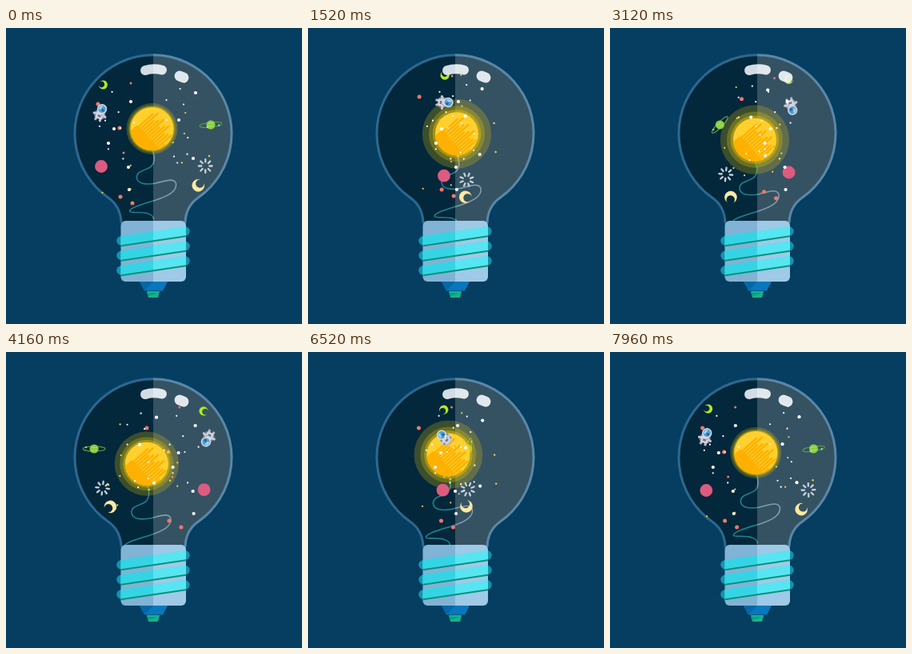
Write an HTML page with a canvas that moves like this. It is 370 px wide and 370 px high and loops after 8000 ms.

```html
<!DOCTYPE html>
<html lang="en">
<head>
<meta charset="utf-8">
<title>Space in a light bulb</title>
<style>
html, body { margin: 0; width: 100%; height: 100%; overflow: hidden; background: #053e60; }
canvas { display: block; width: 370px; height: 370px; }
</style>
</head>
<body>
<canvas id="c"></canvas>
<script>
const LOOP = 8000, TAU = Math.PI * 2;
const canvas = document.getElementById('c');
const ctx = canvas.getContext('2d');
const dpr = window.devicePixelRatio || 1;
canvas.width = canvas.height = 370 * dpr;

// Straight there and back; each way may bow vertically, lean shifts the bow's peak.
function drift(t, x, y, { dx, dy = 0, out = 0, back = 0, lean = 1 }) {
  const going = t < LOOP / 2;
  const k = going ? t / 4000 : 2 - t / 4000;
  const bow = going ? out * Math.sin(Math.PI * k ** lean) : back * Math.sin(Math.PI * k);
  return [x + dx * k, y + dy * k + bow];
}

let seed = 11;
function rand(min, max) {
  seed = (seed * 16807) % 2147483647;
  return min + (max - min) * seed / 2147483647;
}

function scatter(n, x, y, w, h) {
  return Array.from({ length: n }, () => [rand(x, x + w), rand(y, y + h)]);
}

const eastward = { dx: 84 };
const westward = { dx: -51, out: -5.3, back: 5 };
const arching = { dx: 63.5, out: -9.7 };
const falling = { dx: -84, dy: 24, out: -19 };
const rising = { dx: 61, dy: -35, out: 9 };

const redStars = [
  { color: '#f0776b', r: 2.5, path: arching, pts: [[115, 95], [142, 125], [143, 211], [158, 219]] },
  { color: '#f0776b', r: 1.5, path: arching, pts: [[156, 69], [147, 156]] }
];
const stars = [
  { color: '#fff', r: 2.1, path: eastward,
    pts: [[156, 92], [128, 144], [135, 126], [153, 174], [154, 202]] },
  { color: '#fff', r: 2.1, path: westward, pts: [[237, 81], [216, 115], [234, 163]] },
  { color: '#fff', r: 1.1, path: eastward, pts: scatter(8, 117, 75, 50, 107) },
  { color: '#fff', r: 1.1, path: westward, pts: scatter(8, 200, 65, 46, 130) },
  { color: '#f5d34a', r: 1.1, path: falling, pts: scatter(5, 207, 65, 18, 128) },
  { color: '#f5d34a', r: 1.1, path: rising, pts: scatter(3, 113, 153, 45, 66) },
  { color: '#f5d34a', r: 1.2, path: westward, pts: [[252, 124], [254, 160]] }
];

// Two flat tones meeting at the bulb's centre line.
function split(left, right, x = 184) {
  const g = ctx.createLinearGradient(x - 1, 0, x + 1, 0);
  g.addColorStop(.5, left);
  g.addColorStop(.5, right);
  return g;
}

function disc(x, y, r, color) {
  ctx.fillStyle = color;
  ctx.beginPath();
  ctx.arc(x, y, r, 0, TAU);
  ctx.fill();
}

function poly(color, ...p) {
  ctx.fillStyle = color;
  ctx.beginPath();
  for (let i = 0; i < p.length; i += 2) ctx.lineTo(p[i], p[i + 1]);
  ctx.fill();
}

function box(x, y, w, h, r, color) {
  ctx.fillStyle = color;
  ctx.beginPath();
  ctx.roundRect(x, y, w, h, r);
  ctx.fill();
}

function line(x1, y1, x2, y2, w, color) {
  ctx.strokeStyle = color;
  ctx.lineWidth = w;
  ctx.beginPath();
  ctx.moveTo(x1, y1);
  ctx.lineTo(x2, y2);
  ctx.stroke();
}

function placed([x, y], angle, draw) {
  ctx.save();
  ctx.translate(x, y);
  ctx.rotate(angle);
  draw();
  ctx.restore();
}

const bulb = new Path2D(
  'M144 243C143.5 230 138 219 127 211.5A98 98 0 1 1 241 211.5C230 219 224.5 230 224 243');
const cord = new Path2D(
  'M183 150C186 160 188 168 181 174C172 179 164 179 164 187C165 196 178 196 188 194' +
  'C200 191 210 187 213 194C215 204 203 210 188 215C172 220 156 224 155 229' +
  'C156 232 170 229 178 232C182 233 185 236 185 239');

function drawGlass() {
  ctx.fillStyle = split('#03273b', '#355263');
  ctx.fill(bulb);
  ctx.strokeStyle = split('#2c688f', '#5987a7');
  ctx.lineWidth = 3;
  ctx.stroke(bulb);
}

function drawCord(x, y) {
  ctx.save();
  ctx.translate(x - 183, y - 126);
  ctx.strokeStyle = split('#1f7f8c', '#7f9ba8', 184 - x + 183);
  ctx.lineWidth = 1.6;
  ctx.stroke(cord);
  ctx.restore();
}

function drawBase() {
  poly('#0877bb', 167, 317, 202, 317, 196, 328.5, 173, 328.5);
  poly('#0667a6', 167, 317, 184, 317, 173, 328.5);
  poly('#12b48c', 176, 329, 192, 329, 190, 337, 178, 337);
  poly('#0d9a80', 176, 331, 190, 331, 178, 335);
  box(143.5, 241, 81.5, 76, 6, split('#80b3d5', '#9ecae7'));
  ctx.lineCap = 'round';
  for (let y = 266; y < 310; y += 18.5) {
    line(144, y, 224, y - 12, 11.5, 'rgba(28,211,230,.58)');
    ctx.save();
    ctx.beginPath();
    ctx.rect(143.5, 241, 81.5, 76);
    ctx.clip();
    line(144, y, 224, y - 12, 11.5, split('#35d4e5', '#57e5f2'));
    line(144, y + 6.2, 225, y - 5.8, 2, '#07947c');
    ctx.restore();
  }
}

function drawSun(x, y, halo) {
  for (const [reach, alpha] of [[1, .24], [.5, .28], [.2, .4]])
    disc(x, y, 27 + (halo - 27) * reach, `rgba(238,200,0,${alpha})`);
  disc(x, y, 27, '#ffd02e');
  ctx.save();
  ctx.beginPath();
  ctx.arc(x, y, 27, 0, TAU);
  ctx.clip();
  ctx.translate(x, y);
  ctx.rotate(-.72);
  ctx.lineCap = 'round';
  for (let i = 0; i < 12; i++) {
    const v = -13 + i * 3.5;
    line(-30, v, 13 + 6 * Math.sin(i * 2.1) - Math.max(0, i - 8) * 3, v, 2.4, '#ffb000');
  }
  box(-30, -16, 20, 46, 4, '#ffb000');
  ctx.restore();
}

function drawPlanet() {
  ctx.strokeStyle = '#589c43';
  ctx.lineWidth = 1.1;
  ctx.beginPath();
  ctx.ellipse(0, 0, 14, 3, 0, 0, TAU);
  ctx.stroke();
  disc(0, 0, 5.6, '#86cf45');
  for (const y of [-2, 1.5]) line(-3.5, y, 3, y, 1.2, '#a7e25c');
  disc(10, 1.8, 1.2, '#a7e25c');
}

// The bite sits toward +x.
function crescent(r, color) {
  const d = r * .38, b = r * .67;
  const px = (r * r - b * b + d * d) / (2 * d);
  const a = Math.acos(px / r);
  const q = Math.atan2(r * Math.sin(a), px - d);
  ctx.fillStyle = color;
  ctx.beginPath();
  ctx.arc(0, 0, r, a, TAU - a);
  ctx.arc(d, 0, b, -q, q, true);
  ctx.fill();
}

function drawBurst() {
  ctx.lineCap = 'round';
  for (let i = 0; i < 8; i++) {
    ctx.rotate(TAU / 8);
    line(5, 0, 8.4, 0, 2.3, '#c5d0d7');
  }
}

function drawAstronaut() {
  box(-6.5, -1, 13, 9, 2, '#7d8398');
  ctx.lineCap = 'round';
  for (const s of [-1, 1]) {
    line(s * 4, 3, s * 7.5, 4, 3, '#c6cad6');
    line(s * 2.6, 8, s * 3, 10.5, 3.2, '#b4b9c8');
  }
  box(-4.5, 0, 9, 9, 2, '#d3d7e1');
  box(-2, 4, 4, 2.6, .5, '#6c7488');
  disc(2.8, 3, .8, '#e8695f');
  disc(0, -4, 6.2, '#d6dbe6');
  disc(0, -4, 4.7, '#4da0d6');
  poly('#a8d8f2', -3, -7, 0, -8, -2, -2, -4, -3);
  disc(1.5, -2.8, 1.8, '#2c6797');
}

function drawStars(t, groups) {
  for (const { pts, path, r, color } of groups)
    for (const [x, y] of pts) disc(...drift(t, x, y, path), r, color);
}

function drawHighlights() {
  const tone = split('rgba(227,234,240,.93)', 'rgba(238,243,247,.93)');
  ctx.lineCap = 'round';
  ctx.strokeStyle = tone;
  ctx.lineWidth = 12;
  ctx.beginPath();
  ctx.moveTo(174, 53);
  ctx.quadraticCurveTo(184, 50, 195, 52.5);
  ctx.stroke();
  line(217, 60, 222, 62, 12.8, tone);
}

function frame(t) {
  const spin = t / LOOP * TAU;
  const at = (x, y, path) => drift(t, x, y, path);
  const sunX = 179.5 + 6.5 * Math.cos(spin - 1.1);
  const sunY = 133 + 7.3 * Math.cos(spin - 2.87);
  const halo = 41 - 4 * Math.cos(spin) - 5 * Math.cos(2 * spin);

  ctx.setTransform(dpr, 0, 0, dpr, 0, 0);
  ctx.fillStyle = '#053e60';
  ctx.fillRect(0, 0, 370, 370);
  drawGlass();
  drawCord(sunX, sunY);
  drawBase();

  drawStars(t, redStars);
  placed(at(256, 121, { dx: -152 }), spin - .12, drawPlanet);
  placed(at(249.3, 172.5, { dx: -134, dy: -2.5, out: 19.5 }), spin, drawBurst);
  drawSun(sunX, sunY, halo);
  disc(...at(119, 173, { dx: 134, dy: -1, out: 13 }), 7.9, '#de5b80');
  placed(at(240.3, 196.7, { dx: -114.5, dy: -3, out: 21.6, back: -3, lean: 1.4 }),
    spin - .8, () => crescent(7.8, '#ffe9a0'));
  placed(at(121.3, 71, { dx: 131, dy: 3, out: -14 }), spin + 3.4, () => crescent(5.6, '#b0ea1e'));
  placed(at(118.5, 105, { dx: 139, dy: 4, out: -14.5 }), spin + .38, drawAstronaut);
  drawStars(t, stars);
  drawHighlights();
}

const start = performance.now();
function tick() {
  frame((performance.now() - start) % LOOP);
  requestAnimationFrame(tick);
}
tick();
</script>
</body>
</html>
```
